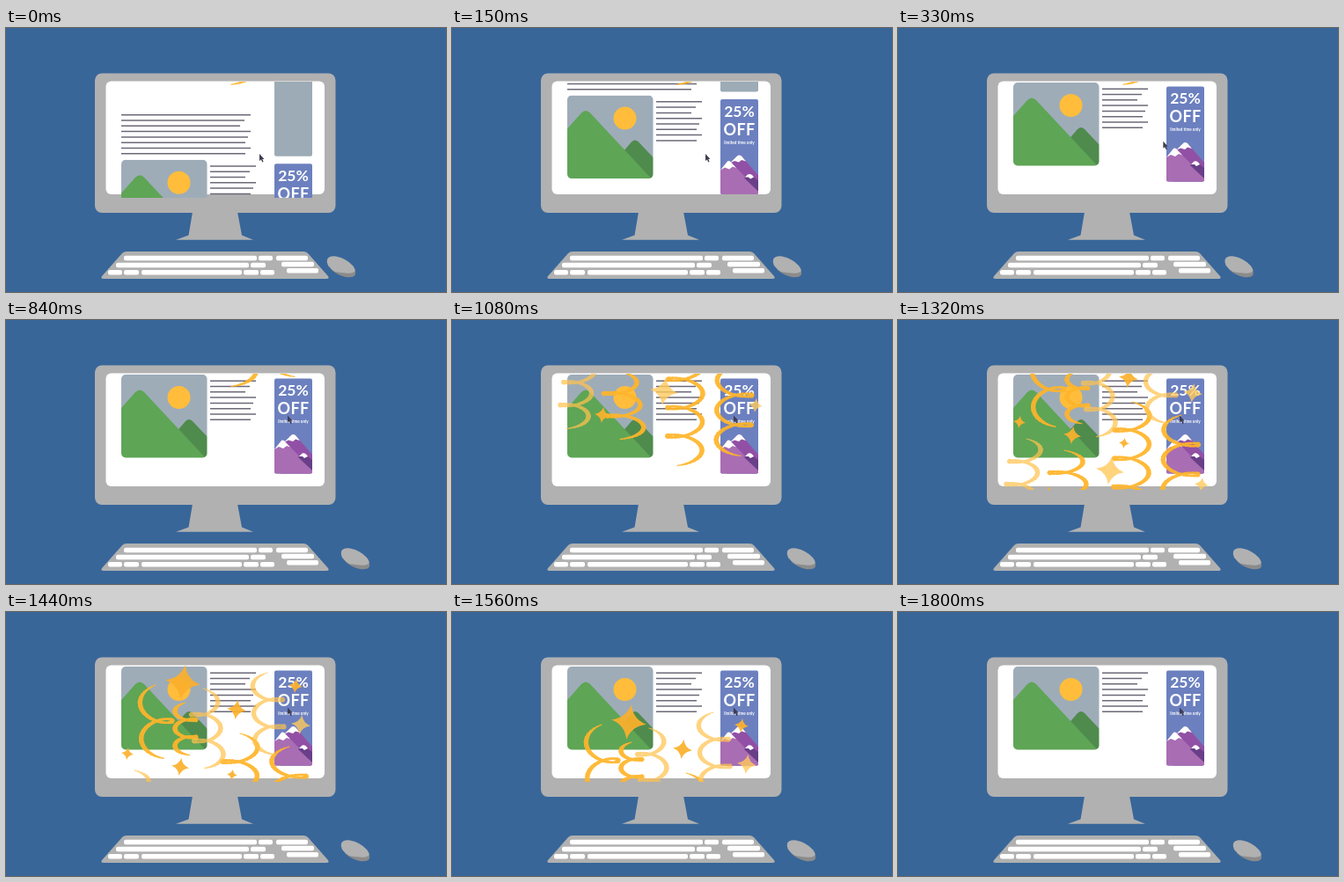
An HTML page for the animation above (4.05 s loop, 500x300 px).

```html
<!DOCTYPE html>
<html lang="en">
<head>
<meta charset="utf-8">
<title>Computer with confetti</title>
<style>
  html, body { margin: 0; width: 100%; height: 100%; overflow: hidden; background: #386699; }
  svg { display: block; width: 100vw; height: 100vh; }
  text { font-family: Lato, sans-serif; font-weight: 700; fill: #fff; text-anchor: middle; }
  .metal { fill: #b1b1b1; }
  .keys { fill: #fff; }
  .lines { stroke: #6c6877; stroke-width: 1.5; }
</style>
</head>
<body>
<svg viewBox="0 0 500 300">
  <defs>
    <clipPath id="view"><rect x="113" y="61" width="249" height="132"/></clipPath>
    <clipPath id="photoShape"><rect x="131" y="62" width="97.5" height="94.5" rx="5"/></clipPath>
    <clipPath id="adShape"><rect x="305" y="66.5" width="43" height="108" rx="2"/></clipPath>
  </defs>
  <rect width="500" height="300" fill="#386699"/>

  <rect class="metal" x="101" y="51.5" width="273.5" height="158.5" rx="8"/>
  <path class="metal" d="M212 209H263L268 235.5L281 240.7H193L207.5 235.5Z"/>
  <rect x="113.500" y="60.500" width="248.500" height="128.500" rx="6" fill="#fff"/>

  <g clip-path="url(#view)">
    <g id="page">
      <g id="text" class="lines"></g>
      <rect x="305" y="-60" width="43" height="118" rx="2" fill="#9cabb5"/>
      <g clip-path="url(#photoShape)" style="mix-blend-mode:multiply">
        <rect x="131" y="62" width="98" height="95" fill="#9eacb8"/>
        <circle cx="196.500" cy="88" r="13" fill="#ffbd3b"/>
        <path d="M185 137L204 115Q208 111 212 115L229 133V157H185Z" fill="#4f8b4d"/>
        <path d="M131 100L147 82Q152 77 157 82L227 157H131Z" fill="#5ea556"/>
      </g>
      <g clip-path="url(#adShape)">
        <rect x="305" y="66" width="43" height="109" fill="#6c80bf"/>
        <path d="M312 144L324 131Q326 129 329 131L348 153V175H312Z" fill="#9150a5"/>
        <path d="M316 139L324 131Q326 129 329 131L334 137L329 135.500L326 138L321 136.500Z" fill="#fff"/>
        <path d="M305 147L313 137Q314 136 316 137L348 170V175H305Z" fill="#a96db3"/>
        <path d="M305 147L313 137Q314 136 316 137L323 144.500L319 143L315 146L310 144Z" fill="#fff"/>
        <path d="M332 156L338 151.500L348 159V171Z" fill="#693f88"/>
        <path d="M333 155L336 152Q338 150.500 341 152.500L343 155L339 157L337 155Z" fill="#fff"/>
        <text x="326.500" y="86" font-size="17.500">25%</text>
        <text x="326.500" y="107" font-size="18" letter-spacing=".4">OFF</text>
        <text x="326.500" y="117" font-size="4.600">limited time only</text>
      </g>
    </g>
    <path id="cursor" d="M0 0V8L1.800 6.500L3.300 9.500L4.600 8.900L3.300 6H5.500Z" fill="#3f3d50"/>
    <g id="confetti"></g>
  </g>

  <path class="metal" d="M137 254H338Q341 254 343 256L366 282Q368 285 364 285H111Q107 285 109 282L132 256Q134 254 137 254Z"/>
  <g id="keys" class="keys"></g>
  <g id="mouse">
    <path d="M382 266L412 274Q414 278 412.500 281Q410 284 402 283Q393 281 386 275Z" fill="#8b8b8b"/>
    <path class="metal" d="M381 263Q383 258.500 391 259.500Q403 262 410 270Q414 275 412 277Q409 279.500 402 278.500Q397 278 390 277Q385 274 382 270Q380 266 381 263Z"/>
  </g>
</svg>
<script>
const LOOP = 4050, STEP = 30, TAU = 2 * Math.PI;
const FALL_START = 810, FALL_REST = 1320, FALL_SPEED = 0.375;
const ORANGE = '#ffb52b', PALE = '#ffc34f';
const byId = id => document.getElementById(id);
const lerp = (a, b, u) => a + (b - a) * u;
const progress = (t, from, to) => Math.min(1, Math.max(0, (t - from) / (to - from)));
const moveTo = (id, x, y) => byId(id).setAttribute('transform', `translate(${x} ${y})`);

function add(parent, tag, attrs) {
  const el = document.createElementNS('http://www.w3.org/2000/svg', tag);
  for (const name in attrs) el.setAttribute(name, attrs[name]);
  return parent.appendChild(el);
}

function paragraph(x, y) {
  [52, 45, 40, 52, 49, 46, 52, 46].forEach((width, i) => {
    const extra = x < 200 ? 95 : 0;
    const lineY = y + i * 6.3;
    add(byId('text'), 'line', { x1: x, x2: x + width + extra, y1: lineY, y2: lineY });
  });
}

function keyRow(y, spans) {
  for (const [from, to] of spans)
    add(byId('keys'), 'rect', { x: from, y, width: to - from, height: 5.5, rx: 2 });
}

// A looping ribbon; a positive radius bulges right, a negative one left.
function ribbon(x0, y0, x1, y1, turns, radius, pale) {
  const height = (y1 - y0) / (1 + 0.477 / turns);
  const lift = 1.5 * height / (TAU * turns);
  const count = Math.round(turns * 26);
  const group = add(byId('confetti'), 'g', {
    stroke: pale ? PALE : ORANGE, opacity: pale ? 0.72 : 0.93, 'stroke-linecap': 'round'
  });
  const point = u => {
    const angle = -TAU / 4 + u * (turns * TAU + 0.4);
    return [lerp(x0, x1, u) + radius * Math.cos(angle),
            y0 + u * height + lift * (1 + Math.sin(angle))];
  };
  for (let i = 0; i < count; i++) {
    const [ax, ay] = point(i / count), [bx, by] = point((i + 1) / count);
    const slant = Math.abs(by - ay) / Math.hypot(bx - ax, by - ay);
    const taper = Math.min(1, 0.35 + i / 8, 0.35 + (count - i) / 8);
    add(group, 'line', { x1: ax, y1: ay, x2: bx, y2: by, 'stroke-width': (2.5 + 2.8 * slant) * taper });
  }
}

function star(x, y, r, pale) {
  const c = r * 0.2;
  add(byId('confetti'), 'path', {
    d: `M0 ${-r}Q${c} ${-c} ${r} 0Q${c} ${c} 0 ${r}Q${-c} ${c} ${-r} 0Q${-c} ${-c} 0 ${-r}Z`,
    transform: `translate(${x} ${y}) rotate(8)`,
    fill: pale ? '#ffc95c' : '#fbb02d', opacity: pale ? 0.8 : 0.93
  });
}

paragraph(131, 11);
paragraph(232, 69.2);

keyRow(258.8, [[134, 285], [287, 303], [307, 343]]);
keyRow(266.8, [[125, 276], [278, 295]]);
keyRow(265.8, [[313, 350]]);
keyRow(275, [[116, 132], [134, 151], [154, 268], [270, 287], [289, 305]]);
keyRow(273, [[319, 355]]);

ribbon(146, 135, 137, 214, 2.5, 17, true);
ribbon(189, 148, 199, 226, 2.5, 20);
ribbon(266, 93, 264, 256, 4.5, 20);
ribbon(322, 108, 320, 245, 3.5, -20);
ribbon(170, 38, 172, 122, 1.5, -18);
ribbon(204, 58, 204, 118, 2.5, -12);
ribbon(224, 42, 232, 133, 2.5, 16, true);
ribbon(297, 24, 300, 118, 2.5, -17, true);

star(138, 116, 7);
star(198, 131, 10);
star(262, 66, 11);
star(257, 140, 6);
star(171, 198, 9);
star(201, 35, 20);
star(329, 39, 8);
star(241, 171, 16, true);
star(345, 187, 8, true);
star(335, 83, 11, true);

function draw(now) {
  const t = Math.floor(now % LOOP / STEP) * STEP;
  const glide = progress(t, 180, 540);
  moveTo('page', 0, lerp(87.7, 0, progress(t, 0, 180)));
  moveTo('cursor', lerp(288, 320, glide), lerp(143, 108.5, glide));
  moveTo('mouse', lerp(-16, 0, glide), 0);
  moveTo('confetti', 0, (Math.max(t, FALL_START) - FALL_REST) * FALL_SPEED);
}

const start = performance.now();
function tick() {
  draw(performance.now() - start);
  requestAnimationFrame(tick);
}
tick();
</script>
</body>
</html>
```
